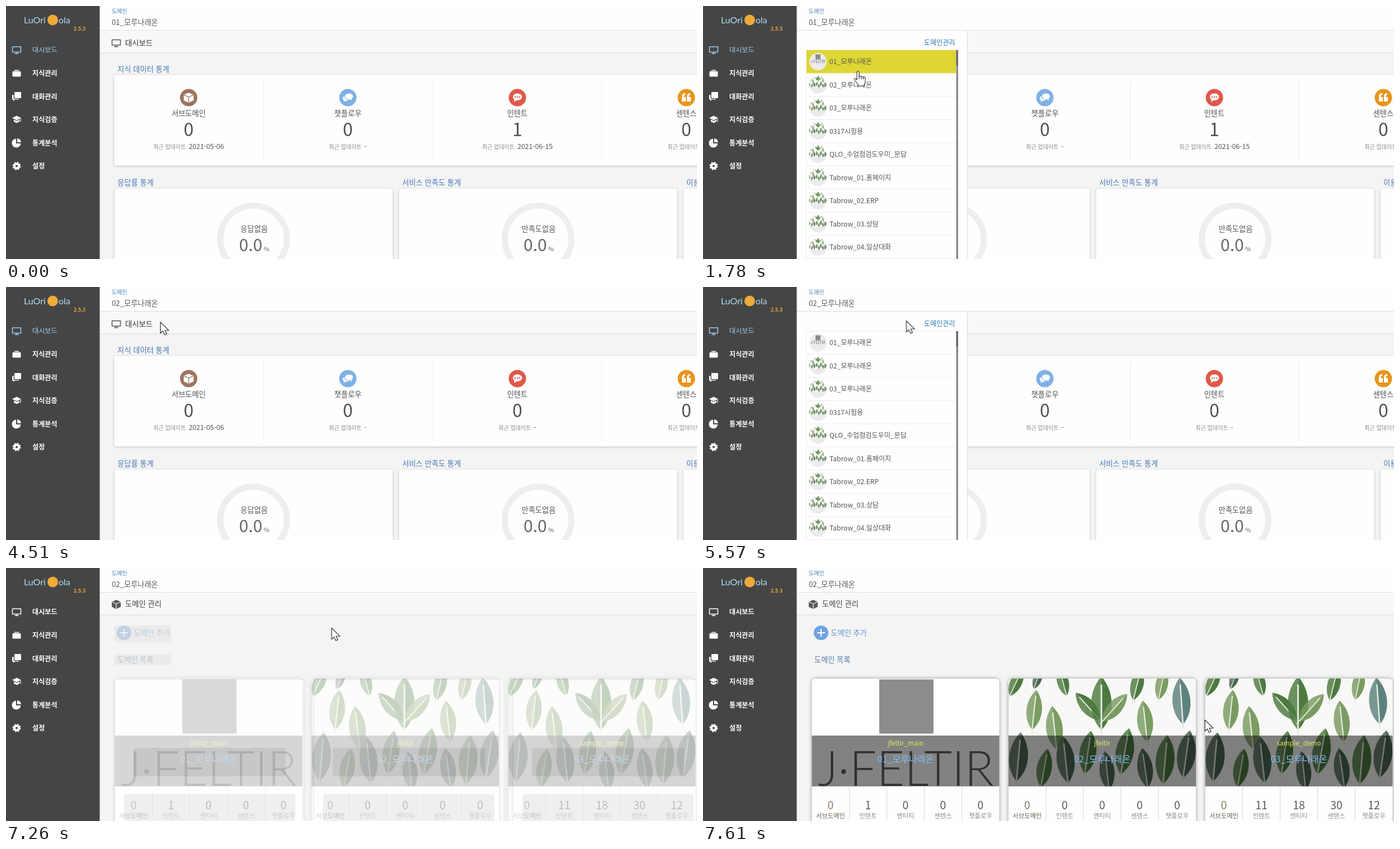
An HTML page for the animation above (7670 ms loop, 1235x453 px).

```html
<!DOCTYPE html>
<html lang="ko">
<head>
<meta charset="utf-8">
<title>Dashboard</title>
<style>
html, body { margin: 0; width: 100%; height: 100%; overflow: hidden; background: #f4f4f4; }
svg { display: block; width: 100%; height: 100%; }
text { font-family: "Noto Sans CJK KR", "Noto Sans CJK", "Noto Sans", sans-serif; white-space: pre; }
.latin { font-family: Lato, sans-serif; }
.card { fill: #fefefe; filter: drop-shadow(0 1px 2px #0003); }
.raised { fill: #fefefe; filter: drop-shadow(0 0 3px #0006); }
.line { fill: none; stroke: #ececec; }
.bone { fill: #e8e8e8; }
.icon { fill: none; stroke-width: 1.5; stroke-linejoin: round; stroke-linecap: round; }
</style>
</head>
<body>
<svg id="stage" viewBox="0 0 1235 453"></svg>
<script>
const LOOP = 7670;

// Text is placed by the vertical centre of its glyphs.
const text = (x, cy, str, size, fill, extra = '') =>
  `<text x="${x}" y="${cy + size * .37}" font-size="${size}" fill="${fill}" ${extra}>${str}</text>`;
const mid = (x, cy, str, size, fill, extra = '') =>
  text(x, cy, str, size, fill, 'text-anchor="middle" ' + extra);
const box = (x, y, w, h, attrs = '', r = 0) =>
  `<rect x="${x}" y="${y}" width="${w}" height="${h}" rx="${r}" ${attrs}/>`;
const bone = (x, y, w, h) => box(x, y, w, h, 'class="bone"', 3);
const card = (x, y, w, h) => box(x, y, w, h, 'class="card"', 4);
const group = (id, ...parts) => `<g id="${id}">${parts.join('')}</g>`;
const at = (x, y, body, more = '') => `<g transform="translate(${x} ${y}) ${more}">${body}</g>`;
const path = (d, attrs) => `<path d="${d}" ${attrs}/>`;
const each = (list, draw) => list.map(draw).join('');

// Icons, each drawn around its own centre
const monitor = color => path('M-7.5 -5.5H7.5V4H-7.5ZM0 4V6.5M-3 6.8H3', `class="icon" stroke="${color}"`);
const cube = (fill, line) =>
  path('M0 -8L8 -4.5V4.5L0 8.5L-8 4.5V-4.5Z', `fill="${fill}"`) +
  path('M-8 -4.5L0 -.8L8 -4.5M0 -.8V8.5', `fill="none" stroke="${line}" stroke-width="1.2"`);
const white = d => path(d, 'fill="#fff"');
const menuIcons = [
  white('M-4 -6H4V-4.5H-4ZM-6 -3.8H6Q7.5 -3.8 7.5 -2V4.5Q7.5 6 6 6H-6Q-7.5 6 -7.5 4.5V-2Q-7.5 -3.8 -6 -3.8Z'),
  white('M-3 -8H7Q8 -8 8 -7V2Q8 3 7 3H-3Q-4 3 -4 2V-7Q-4 -8 -3 -8Z') +
    white('M-7 -3H-5.3V4.3H4V5.5H-3L-6 8V5.5H-8V-2Z'),
  white('M0 -7L8 -3L0 1L-8 -3ZM-5 -.3L0 2.3L5 -.3V3.5L0 6L-5 3.5ZM6.5 -2H7.7V4H6.5Z'),
  white('M-1 -7.5V1H7.5A8 8 0 1 1 -1 -7.5Z') + white('M1 -8A8 8 0 0 1 8 -1H1Z'),
  '<circle r="4" fill="none" stroke="#fff" stroke-width="4"/>' +
    '<circle r="6.2" fill="none" stroke="#fff" stroke-width="2.6" stroke-dasharray="2.6 2.27"/>'
];
const bubble = 'M0 -7.5C11 -7.5 11 5 0 5L-2 5L-6 8L-5.5 3.5C-11 -1 -7 -7.5 0 -7.5Z';
const statIcons = [
  ['#9c7560', `<g transform="scale(1.1)">${cube('#fff', '#9c7560')}</g>`],
  ['#7fb0e6', at(-3, 2, white(bubble), 'scale(.75)') +
    at(2, -1, path(bubble, 'fill="#fff" stroke="#7fb0e6" stroke-width="1.3"'), 'scale(-.95 .95)')],
  ['#e0584a', white(bubble) + each([-4, 0, 4], x => `<circle cx="${x}" cy="-1" r="1.3" fill="#e0584a"/>`)],
  ['#e8951c', each([-8, 1], x => at(x, 0, white('M0 7V-2Q0 -8 6 -8V-5Q3.5 -5 3.5 -1H7V7Z')))]
];

// Leaf print: x, y, height, tilt, tone
const tones = ['#4d7a40', '#7a9c62', '#5c827e', '#4a6650'];
const leaves = [
  [14, 6, 56, 25, 0], [46, 56, 72, 6, 1], [82, 88, 78, -6, 1], [97, 5, 54, -15, 0], [52, 0, 40, 20, 3],
  [142, 50, 66, -42, 0], [166, 44, 96, 0, 0], [190, 52, 66, 42, 1], [230, 10, 60, 14, 0],
  [244, 76, 74, -6, 1], [274, 10, 58, 12, 1], [309, 40, 84, -4, 2], [18, 140, 88, 5, 3],
  [64, 160, 70, 10, 0], [102, 145, 84, -6, 3], [142, 132, 78, 8, 0], [176, 165, 70, -6, 3],
  [208, 130, 84, 10, 0], [244, 160, 72, -8, 3], [280, 145, 88, 5, 0], [318, 135, 86, 8, 3]
];
const half = 'M0 -.5C.26 -.2 .25 .25 0 .5Z';
const leaf = ([x, y, h, tilt, tone]) => at(x, y,
  path(half, `fill="${tones[tone]}"`) +
  path(half, `fill="${tones[tone]}" fill-opacity=".82" transform="scale(-1 1)"`) +
  path('M0 -.35V.6', 'stroke="#e6ebdf" stroke-width=".03"'),
  `rotate(${tilt}) scale(${h})`);

const defs = `<defs>
  <clipPath id="photo"><path d="M0 193V8Q0 0 8 0H327Q335 0 335 8V193Z"/></clipPath>
  <clipPath id="round"><circle r="15.5"/></clipPath>
  <g id="print"><rect width="335" height="193" fill="#f8f9f6"/>${each(leaves, leaf)}</g>
</defs>`;

const blue = '#4a7ab8';
const columns = [326.5, 611, 914, 1216];
const dividers = each([460.5, 763.5, 1064.5], x => path(`M${x} 134V275`, 'class="line"'));

const stat = (i, value, date) =>
  mid(columns[i], 221, value, 32, '#505050', 'font-weight="300"') +
  mid(columns[i], 252, `최근 업데이트<tspan dx="5" font-size="12.3" fill="#555">${date}</tspan>`, 10, '#888');
const donut = (x, label) =>
  `<circle cx="${x}" cy="417" r="59.5" fill="none" stroke="#eee" stroke-width="11"/>` +
  mid(x + 1, 399, label, 13.3, '#555') +
  text(x - 26, 428, '0.0', 30, '#666', 'font-weight="300"') + text(x + 18, 435, '%', 11, '#666');

const dashboard = group('dash',
  box(168, 84, 1067, 369, 'fill="#f4f4f4"'),
  text(199, 113, '지식 데이터 통계', 13.3, blue),
  card(193.5, 123.5, 1100, 162), dividers,
  each(['서브도메인', '챗플로우', '인텐트', '센텐스'], (name, i) =>
    at(columns[i], 164, `<circle r="15.5" fill="${statIcons[i][0]}"/>` + statIcons[i][1]) +
    mid(columns[i], 192, name, 13.3, '#505050')),
  stat(0, 0, '2021-05-06'), stat(1, 0, '-'), stat(3, 0, '-'),
  group('intentBefore', stat(2, 1, '2021-06-15')),
  group('intentAfter', stat(2, 0, '-')),
  each([[199, '응답률 통계'], [708, '서비스 만족도 통계'], [1216, '이용자 통계']],
    ([x, title]) => text(x, 316, title, 13.3, blue)),
  each([194, 702.5, 1211], x => card(x, 327, 497, 160)),
  donut(442.5, '응답없음'), donut(951, '만족도없음'));

const dashBones = group('dashBones',
  bone(193.5, 103, 101.5, 24),
  card(193.5, 123.5, 1100, 162), dividers,
  each(columns, x => bone(x - 40.5, 140, 81, 61) + bone(x - 20.5, 205.5, 41, 30.5) + bone(x - 76, 245, 152, 15.5)),
  each([193.5, 702, 1210.5], x => bone(x, 306, 101.5, 24) + bone(x + 396.5, 306, 101.5, 24) + card(x, 326, 498, 160)),
  bone(367, 351, 152, 140), bone(875, 351, 152, 140), bone(1231, 351, 152, 140));

const listBones = group('listBones',
  bone(193.5, 103, 101.5, 30.5), bone(193.5, 154, 101.5, 20),
  each([194, 550, 906], x =>
    box(x, 200, 340, 300, 'fill="#fefefe" stroke="#dcdcdc"', 4) +
    bone(x + 34, 322, 272, 51) + bone(x + 17, 405, 306, 80)));

const emblem =
  box(0, 0, 335, 193, 'fill="#fff"') + box(120.5, 1.5, 97, 97, 'fill="#8b8c8c"') +
  mid(168, 160, 'J·FELTIR', 86, '#606060', 'class="latin" font-weight="300"');
const domainCards = [
  ['jfeltir_main', '01_모루나래온', [0, 1, 0, 0, 0]],
  ['jfeltir', '02_모루나래온', [0, 0, 0, 0, 0]],
  ['sample_demo', '03_모루나래온', [0, 11, 18, 30, 12]]
];
const statNames = ['서브도메인', '인텐트', '엔티티', '센텐스', '챗플로우'];
const domainCard = ([key, name, counts], i) => at(194.5 + 351.5 * i, 198,
  box(0, 0, 335, 300, 'class="raised"', 8) +
  `<g clip-path="url(#photo)">${i ? '<use href="#print"/>' : emblem}</g>` +
  box(0, 102, 335, 91, 'fill="#000" fill-opacity=".49"') +
  mid(167.5, 116, key, 11.8, '#e4ea5c') +
  mid(167.5, 144, name, 16.1, '#80bdf4', 'font-weight="500"') +
  each(counts, (n, k) =>
    (k ? path(`M${67 * k} 193V260`, 'stroke="#cfdcdc"') : '') +
    mid(33.5 + 67 * k, 226.5, n, 19.5, k ? '#555c58' : '#8a7c6c') +
    mid(33.5 + 67 * k, 245.5, statNames[k], 11.3, k ? '#8a8a80' : '#6d6052')));

const manage = group('manage',
  box(168, 86, 1067, 367, 'fill="#f4f4f4"'),
  '<circle cx="211" cy="116" r="13" fill="#6fa3e2"/>',
  path('M204 116H218M211 109V123', 'stroke="#fff" stroke-width="2.2"'),
  text(228.5, 116.5, '도메인 추가', 13.2, '#6096cf'),
  text(199, 164, '도메인 목록', 13.2, '#4f7ca8'),
  each(domainCards, domainCard));

const header =
  box(167, 0, 1068, 43, 'fill="#fefefe"') + box(167, 44, 1068, 40, 'fill="#f8f8f8"') +
  group('fieldHover', box(178, 19, 284, 21, 'fill="#f3f3f3"')) +
  group('headText',
    text(189, 9, '도메인', 10, '#4080b5'),
    box(168, 83, 1067, 1, 'fill="#e4e4e4"'), box(168, 84, 1067, 2, 'fill="#eeeeee"')) +
  group('firstName', text(189, 29.5, '01_모루나래온', 13.2, '#5a5a5a')) +
  group('secondName', text(189, 29.5, '02_모루나래온', 13.2, '#5a5a5a')) +
  group('dashTitle', at(197, 66, monitor('#555')), text(213, 66, '대시보드', 13.3, '#333')) +
  group('manageTitle', at(197, 65, cube('#555a5e', '#f8f8f8')), text(213, 64.5, '도메인 관리', 13.3, '#444')) +
  box(168, 43, 1067, 1, 'fill="#dedede"');

const menuItem = (y, label, icon, color = '#fff', weight = 700) =>
  at(19, y, icon) + text(47, y + .5, label, 12.1, color, `font-weight="${weight}"`);
const sidebar =
  box(0, 0, 167.5, 453, 'fill="#454545"') +
  text(32, 25, 'LuOri', 16, '#b0dff2', 'class="latin"') +
  '<circle cx="83.5" cy="25" r="9.5" fill="#efab38"/>' +
  text(94, 25, 'ola', 16, '#b0dff2', 'class="latin"') +
  group('menu',
    text(121, 40.5, '2.5.3', 8.8, '#f0b03c', 'font-weight="700"'),
    each(['지식관리', '대화관리', '지식검증', '통계분석', '설정'],
      (label, i) => menuItem(120.5 + 41.5 * i, label, menuIcons[i])),
    group('homeActive', menuItem(78.5, '대시보드', monitor('#a3cdf2'), '#a3cdf2', 400)),
    group('homeIdle', menuItem(78.5, '대시보드', monitor('#fff'))));

const domains = ['01_모루나래온', '02_모루나래온', '03_모루나래온', '0317시험용', 'QLO_수업점검도우미_문답',
  'Tabrow_01.홈페이지', 'Tabrow_02.ERP', 'Tabrow_03.상담', 'Tabrow_04.일상대화'];
const rowTop = i => 79 + 41.5 * i;
const avatar = i => '<circle r="15.5" fill="#ebebeb"/>' + (i
  ? `<g clip-path="url(#round)"><use href="#print" transform="translate(-18 -16) scale(.11)"/></g>`
  : box(-4.5, -13, 9, 9, 'fill="#8b8c8c"') + mid(0, 0, 'J·FELTIR', 7, '#777', 'class="latin"'));
const dropdown = group('dropdown',
  box(168, 44, 304, 420, 'fill="#fefefe"'), path('M472.5 44V453', 'stroke="#dcdcdc"'),
  text(395, 65.5, '도메인관리', 12.1, '#2a78b0'),
  path('M184.5 453V79H452', 'class="line"'),
  ...[0, 1].map(i => group('row' + i, box(185, rowTop(i), 267, 41.5, 'fill="#ded633"'))),
  each(domains, (name, i) =>
    path(`M185 ${rowTop(i + 1)}H452`, 'class="line"') +
    at(205.5, rowTop(i) + 20.5, avatar(i)) + text(226, rowTop(i) + 21, name, 12.1, '#555')),
  box(452.5, 79, 3.5, 374, 'fill="#8a8a8a"'), box(452.5, 79, 3.5, 28, 'fill="#6c6c6c"'));

const ink = 'fill="#fff" stroke="#222" stroke-width="1.1" stroke-linejoin="round"';
const pointer = group('pointer', group('pointerMove',
  group('arrow', path('M0 0V20L4.5 16L7.5 22.5L11 21L8 14.8H15Z', ink)),
  group('hand', path('M-2 1Q0 -1.5 2 1V9Q4 7.5 6 9.3Q8 8.3 9.5 10.3Q12.5 9.5 13 12.5V18Q13 21 11 23V26H0V23L-6.5 15.5Q-7 12 -4 13L-2 15Z' +
    'M2 9V14M6 9.3V14M9.5 10.3V14', ink))));

document.getElementById('stage').innerHTML =
  defs + box(168, 0, 1067, 453, 'fill="#f4f4f4"') +
  dashBones + listBones + dashboard + manage + header + sidebar + dropdown + pointer;

const play = (id, frames) =>
  document.getElementById(id).animate(frames, { duration: LOOP, iterations: Infinity });

// Each stop is [time, opacity, ramp]; without a ramp the change is hard.
function show(ids, start, ...stops) {
  const frames = [{ offset: 0, opacity: start }];
  let last = start;
  for (const [time, opacity, ramp = 0] of stops) {
    frames.push({ offset: time / LOOP, opacity: last }, { offset: (time + ramp) / LOOP, opacity });
    last = opacity;
  }
  frames.push({ offset: 1, opacity: last });
  ids.split(' ').forEach(id => play(id, frames));
}

const LOAD1 = 2850, READY1 = 3530, LOAD2 = 6390, READY2 = 7120;
show('dash', 1, [LOAD1, 0], [READY1 + 20, 1, 720], [LOAD2, 0]);
show('dashBones', 0, [LOAD1, 1], [4300, 0]);
show('listBones', 0, [LOAD2, 1]);
show('manage', 0, [READY2 - 10, 1, 470]);
show('intentBefore firstName', 1, [LOAD1, 0]);
show('intentAfter', 0, [LOAD1, 1]);
show('secondName', 0, [READY1, 1], [LOAD2, 0], [READY2, 1]);
show('headText', 1, [LOAD1, 0], [READY1, 1], [LOAD2, 0], [READY2, 1]);
show('dashTitle', 1, [LOAD1, 0], [READY1, 1], [LOAD2, 0]);
show('manageTitle', 0, [READY2, 1]);
show('menu', 1, [LOAD1, 0], [READY1, 1], [LOAD2, 0], [7060, 1]);
show('homeActive', 1, [LOAD2, 0]);
show('homeIdle', 0, [LOAD2, 1]);
show('fieldHover', 0, [970, 1, 140], [1500, 0, 100], [4710, 1, 140], [5400, 0, 100]);
show('dropdown', 0, [1250, 1, 220], [2780, 0, 120], [5180, 1, 220], [6320, 0, 100]);
show('row0', 0, [1680, 1], [1800, 0]);
show('row1', 0, [1800, 1], [2900, 0]);
show('pointer', 0, [200, 1]);
show('arrow', 1, [1710, 0], [LOAD1, 1], [5700, 0], [LOAD2, 1]);
show('hand', 0, [1710, 1], [LOAD1, 0], [5700, 1], [LOAD2, 0]);

const route = [
  [0, 782, 406], [200, 782, 406], [900, 248, 42], [1110, 272, 34], [1400, 272, 34], [1640, 278, 66],
  [1780, 277, 117], [1990, 283, 146], [4300, 283, 146], [4510, 276, 63], [4850, 270, 34], [5300, 270, 34],
  [5770, 432, 80], [5920, 434, 80], [6120, 434, 62], [7000, 434, 62], [7260, 581, 107], [7610, 897, 272],
  [LOOP, 897, 272]
];
play('pointerMove', route.map(([time, x, y]) => ({ offset: time / LOOP, transform: `translate(${x}px, ${y}px)` })));
</script>
</body>
</html>
```
